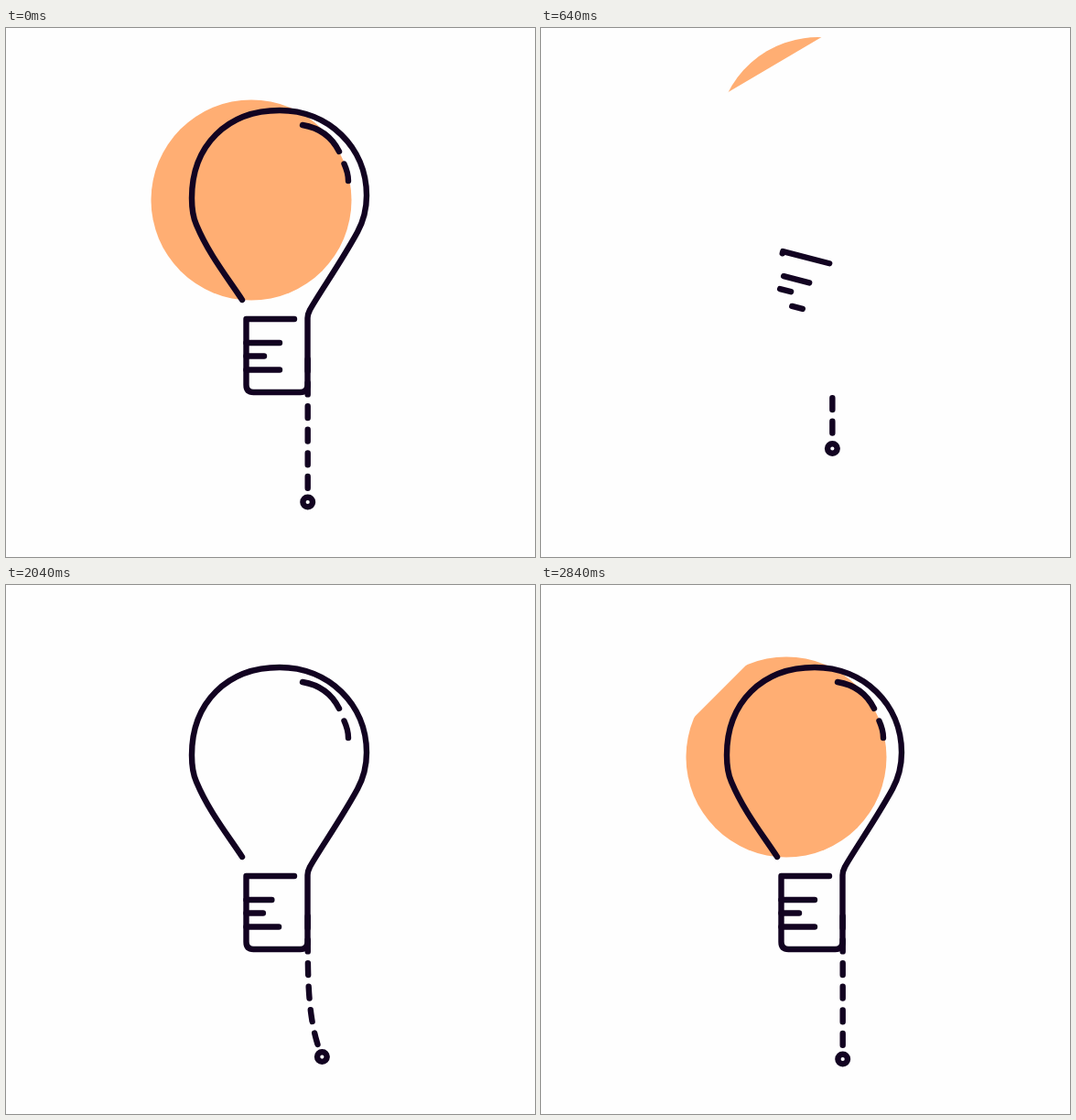
Write an HTML page with a canvas that moves like this. It is 578 by 578 pixels and loops after 2880 ms.

```html
<!DOCTYPE html>
<html lang="en">
<head>
<meta charset="utf-8">
<title>Light bulb</title>
<style>
  html, body { margin: 0; width: 100%; height: 100%; overflow: hidden; background: #fefefe; }
  canvas { display: block; width: 100vmin; height: 100vmin; }
</style>
</head>
<body>
<canvas id="stage" width="578" height="578"></canvas>
<script>
const LOOP = 2880;
const INK = '#120321', GLOW = '#ffae73', PAPER = '#fefefe';
const PIVOT = { x: 289, y: 322 };
const ctx = document.getElementById('stage').getContext('2d');

function shape(d) {
  const el = document.createElementNS('http://www.w3.org/2000/svg', 'path');
  el.setAttribute('d', d);
  return { path: new Path2D(d), len: el.getTotalLength() };
}

// Glass and socket are one continuous line
const bulb = shape('M258 297 C240 270 221 246 208 215 C204 206 203 195 203 186 ' +
  'C203 128 242 90 299 90 C352 90 394 130 394 183 C394 198 390 212 384 223 ' +
  'C366 256 342 290 332 308 C330 312 329.5 314 329.5 317 V390 Q329.5 398 321.5 398 ' +
  'H270.5 Q262.5 398 262.5 390 V318 H315');
const shineA = shape('M324 106 C342 109 356 119 364 135');
const shineB = shape('M369.5 148.5 C372 154 374 160 374 167');
const SHINE_GAP = 14;
const threads = [
  { line: shape('M262.5 344 H299'), out: 547, into: 1822 },
  { line: shape('M262.5 358.5 H282'), out: 509, into: 1768 },
  { line: shape('M262.5 373.5 H299'), out: 443, into: 1752 }
];
// Sideways swing of the cord end: [time, px]
const swing = [[1500, 0], [1760, -14], [2020, 16], [2260, 0]];

const clamp = u => Math.min(1, Math.max(0, u));
const smooth = (t, a, b) => { const u = clamp((t - a) / (b - a)); return u * u * (3 - 2 * u); };
function ease(t, a, b, p = 3) {
  const u = clamp((t - a) / (b - a)), k = 2 ** (p - 1);
  return u < 0.5 ? k * u ** p : 1 - k * (1 - u) ** p;
}
function along(keys, t) {
  for (let i = 1; i < keys.length; i++) {
    const [a, from] = keys[i - 1], [b, to] = keys[i];
    if (t >= a && t < b) return from + (to - from) * smooth(t, a, b);
  }
  return 0;
}

function pose(t) {
  if (t < 1000) return { rise: -68 * ease(t, 310, 690), turn: 24 * ease(t, 270, 960) * Math.PI / 180 };
  const k = Math.max(0, (1779 - t) / 499) ** 3;
  return { rise: 60 * k, turn: -8 * k * Math.PI / 180 };
}

function strokePart(s, from, to) {
  from = Math.max(0, from);
  to = Math.min(s.len, to);
  if (to - from < 0.05) return;
  ctx.setLineDash(from === 0 && to === s.len ? [] : [to - from, 9999]);
  ctx.lineDashOffset = -from;
  ctx.stroke(s.path);
}

function drawGlow(t) {
  if (t > 732 && t < 2460) return;
  const leaving = t < 1000;
  const edge = leaving ? 112 - 225 * ease(t, 412, 732) : 111 - 224 * smooth(t, 2460, 2900);
  ctx.save();
  ctx.translate(268, 188);
  ctx.rotate(Math.PI / 4);
  ctx.beginPath();
  ctx.rect(leaving ? edge - 300 : edge, -150, 300, 300);
  ctx.clip();
  ctx.beginPath();
  ctx.arc(0, 0, 109.5, 0, 7);
  ctx.fillStyle = GLOW;
  ctx.fill();
  ctx.restore();
}

function drawBulb(t) {
  const leaving = t < 1000;
  const part = (s, u) => leaving ? strokePart(s, u * s.len, s.len) : strokePart(s, 0, u * s.len);
  part(bulb, leaving ? ease(t, 0, 890, 3.5) : ease(t, 1083, 1978, 3.5));
  for (const { line, out, into } of threads) {
    const start = leaving ? out : into;
    part(line, smooth(t, start, start + 320));
  }
  const offB = shineA.len + SHINE_GAP, total = offB + shineB.len;
  const from = leaving ? total * ease(t, 0, 640) : 0;
  const to = leaving ? total : total * ease(t, 1400, 1960);
  strokePart(shineA, from, to);
  strokePart(shineB, from - offB, to - offB);
}

function drawCord(t, { rise, turn }) {
  const c = Math.cos(turn), s = Math.sin(turn), len = 156;
  const pull = 42 * (smooth(t, 2240, 2600) - smooth(t, 2600, 2797));
  const x = PIVOT.x + 40.7 * c - 40 * s;
  const y = PIVOT.y + 40.7 * s + 40 * c + rise + pull;
  const sway = along(swing, t);
  const drop = len - sway * sway / 100;
  const from = t < 1000 ? ease(t, 292, 922) : 0;
  const to = Math.min(149 / len, t < 1000 ? 1 : smooth(t, 1300, 1640));

  if (to - from > 0.002) {
    ctx.beginPath();
    for (let i = 0; i <= 40; i++) {
      const u = from + (to - from) * i / 40;
      ctx.lineTo(x + sway * u ** 4, y + drop * u);
    }
    ctx.setLineDash([12.8, 12.8]);
    ctx.lineDashOffset = 0;
    ctx.stroke();
  }

  const size = t < 1000 ? 1 - smooth(t, 800, 940) : smooth(t, 1640, 1800);
  if (size < 0.01) return;
  ctx.save();
  ctx.translate(x + sway, y + drop);
  ctx.scale(size, size);
  ctx.setLineDash([]);
  ctx.beginPath();
  ctx.arc(0, 0, 5.3, 0, 7);
  ctx.fillStyle = PAPER;
  ctx.fill();
  ctx.stroke();
  ctx.restore();
}

function draw(t) {
  const p = pose(t);
  ctx.fillStyle = PAPER;
  ctx.fillRect(0, 0, 578, 578);
  ctx.strokeStyle = INK;
  ctx.lineWidth = 6.4;
  ctx.lineCap = ctx.lineJoin = 'round';
  ctx.save();
  ctx.translate(PIVOT.x, PIVOT.y + p.rise);
  ctx.rotate(p.turn);
  ctx.translate(-PIVOT.x, -PIVOT.y);
  drawGlow(t);
  drawBulb(t);
  ctx.restore();
  drawCord(t, p);
}

const begin = performance.now();
function tick() {
  draw((performance.now() - begin) % LOOP);
  requestAnimationFrame(tick);
}
tick();
</script>
</body>
</html>
```
